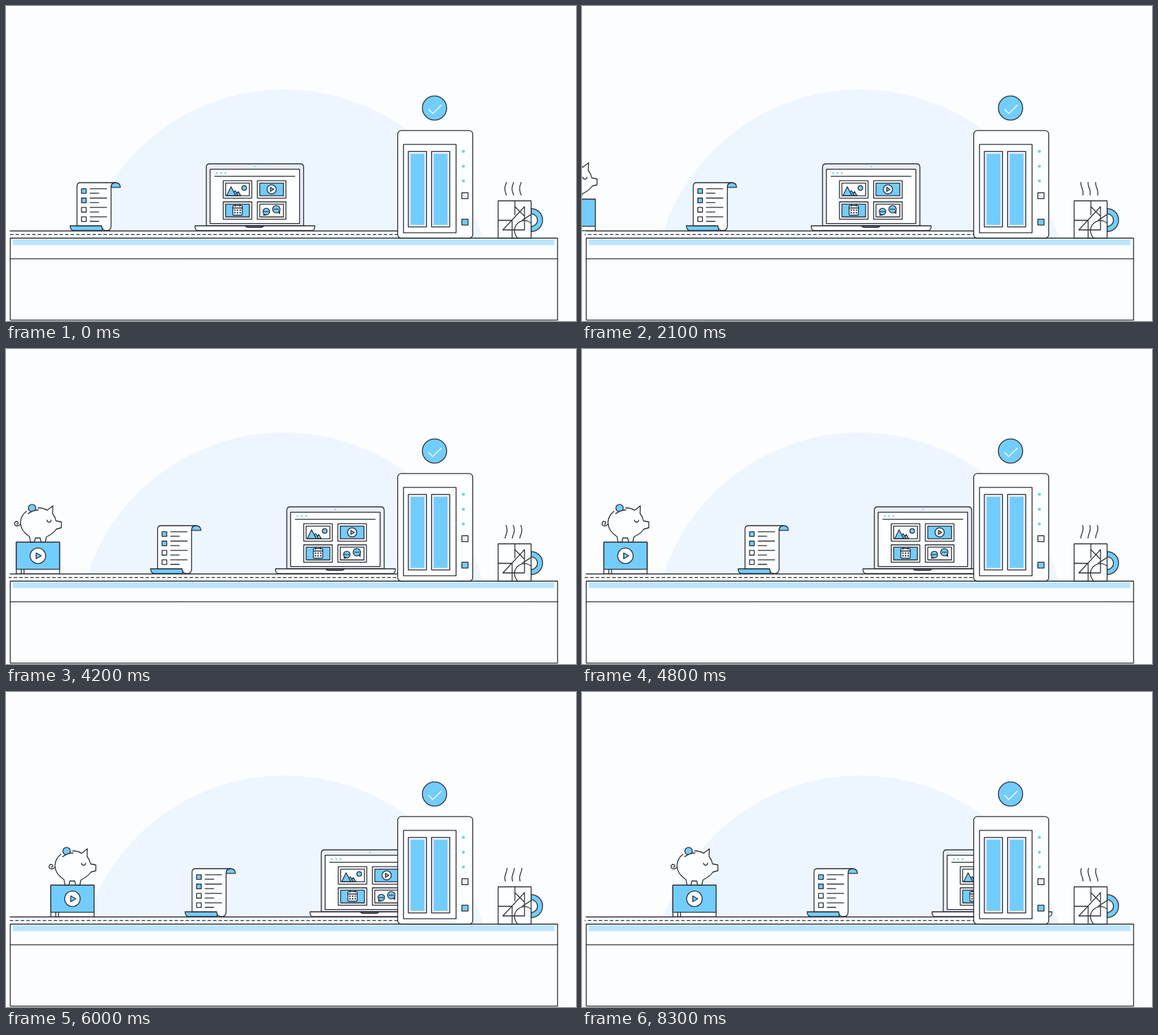
Write an HTML page that moves like this. It is 830 by 460 pixels and loops after 8500 ms.

```html
<!DOCTYPE html>
<html lang="en">
<head>
<meta charset="utf-8">
<title>Conveyor</title>
<style>
  html, body { margin: 0; width: 100%; height: 100%; overflow: hidden; background: #fcfdff; }
  svg { display: block; width: 830px; height: 460px; }
  .ink { fill: none; stroke: #2b2f36; stroke-width: 1.3; stroke-linejoin: round; stroke-linecap: round; }
  .w { fill: #fdfeff; }
  .b { fill: #72cdff; }
  .g { fill: #e9edf5; }
  .dot { fill: #72cdff; stroke: none; }
  .pip { fill: #2b2f36; stroke: none; }
</style>
</head>
<body>
<svg viewBox="0 0 830 460">
  <circle cx="405" cy="423.5" r="301.5" fill="#edf6fe"/>
  <rect y="339" width="830" height="121" fill="#fcfdff"/>

  <g class="ink">
    <!-- belt -->
    <path d="M6 328.5H570V339H6Z" class="w" stroke="none"/>
    <path d="M6 328.5H570"/>
    <path id="dashes" d="M4 333.7H570" stroke-dasharray="5 3" stroke-linecap="butt"/>

    <g id="cargo">
      <!-- book and piggy bank -->
      <g transform="translate(-234.5 0)">
        <rect x="132.3" y="282.2" width="63" height="46" class="w"/>
        <rect x="132.3" y="282.2" width="63" height="39.4" class="b"/>
        <path d="M139.5 322V328M143.5 322V328"/>
        <circle cx="163.7" cy="302" r="11.3" class="w"/>
        <path d="M161.2 297.8L168.6 302L161.2 306.2Z" class="b"/>
        <path class="w" stroke="none" d="M147 237Q153 232 164 232Q172 232 177 235.5L185.5 229L185 240Q189 245 190 251L197.8 252.5V261L190.5 263Q187 269 176 274.5L174.5 282H168.5L167 276H160L158.5 282H153L151.5 274Q138.5 266 138.3 253Q139 243 147 237Z"/>
        <path d="M164 232Q172 232 177 235.5L185.5 229L185 240Q189 245 190 251L197.8 252.5V261L190.5 263Q187 269 176 274.5L174.5 282H168.5L167 276H160L158.5 282H153L151.5 274Q138.5 266 138.3 253Q139 243 147 237"/>
        <circle cx="155.2" cy="232.3" r="5.4" class="b"/>
        <path d="M149.5 240.5Q155 235.5 164.5 235L164 239Q157 238 150 242Z" class="w" stroke="none"/>
        <path d="M149.5 240.5Q156 235.5 164.5 235"/>
        <path d="M177 250Q177.3 253 180 253Q182.7 253 183 250"/>
        <path d="M138.3 256Q134 260 130.6 257.5Q128.5 254.5 131.5 251.8Q135 251.5 135 254.5Q134.5 256.5 132.7 255.5"/>
      </g>

      <!-- checklist -->
      <path class="b" d="M93.3 321H140V328H99Q93.8 328 93.3 321Z"/>
      <path class="w" d="M103.4 321V263Q103.4 258 108.5 258H160Q153 258.5 153 265V321Q153 328 146.3 328Q139.8 328 139.2 321Z"/>
      <path class="b" d="M153 264.8Q153 258 159.5 258Q166 258 166.6 264.8Z"/>
      <g id="checks"></g>

      <!-- laptop -->
      <path class="g" d="M291.6 321V235.5Q291.6 230.5 296.6 230.5H428.4Q433.4 230.5 433.4 235.5V321Z"/>
      <rect x="297.2" y="238.3" width="130.3" height="79.3" class="w"/>
      <circle cx="362.3" cy="234.3" r="1.1" class="dot"/>
      <circle cx="307" cy="244" r="1.3" class="dot"/>
      <circle cx="313.3" cy="244" r="1.3" class="dot"/>
      <circle cx="319.6" cy="244" r="1.3" class="dot"/>
      <path d="M304 248.7H420.5"/>
      <g id="tiles"></g>
      <path class="b" d="M321.5 276.8L327.7 264L334.5 276.8ZM331.5 271.5L334 269.8L337.5 276.8H334.5ZM336 273.5L338.3 271L341.7 276.8H337.5Z"/>
      <circle cx="346.8" cy="265.8" r="3.4" class="b"/>
      <circle cx="386.8" cy="267.8" r="6.7" class="w"/>
      <path class="b" d="M385 264.8L390 267.8L385 270.8Z"/>
      <rect x="330.3" y="291.3" width="13.6" height="14.2" rx="1" class="w"/>
      <path d="M330.3 295H344M333.5 289.5V292.5M340.7 289.5V292.5"/>
      <g id="days"></g>
      <g id="bubbles"></g>
      <path class="w" d="M275.2 321H449.6V323.5Q449 328 444 328H281Q275.8 328 275.2 323.5Z"/>
      <path d="M348.5 321.3H375.3Q374 323.4 371 323.4H353Q349.8 323.4 348.5 321.3Z" fill="#7d8590"/>
    </g>

    <!-- desk -->
    <rect x="6.2" y="339" width="797" height="119.6"/>
    <rect x="10" y="341" width="788.5" height="8.2" fill="#bae5fe" stroke="none"/>
    <path d="M6.2 369.2H803.2"/>

    <!-- machine -->
    <rect x="570.4" y="181.9" width="109.2" height="157.1" rx="5" class="w"/>
    <rect x="578.8" y="202.2" width="76.6" height="129" class="w"/>
    <g id="doors"></g>
    <circle cx="666" cy="212.3" r="2.2" class="dot"/>
    <circle cx="666" cy="234" r="2.2" class="dot"/>
    <circle cx="666" cy="255.4" r="2.2" class="dot"/>
    <rect x="663.8" y="272.7" width="9" height="8.6" class="g"/>
    <rect x="663.8" y="311.3" width="9" height="8.6" class="b"/>
    <circle cx="624" cy="149" r="17.7" class="b"/>
    <path d="M615.3 151L621.3 157L634 144.8" style="stroke:#fff"/>

    <!-- mug -->
    <path class="b" d="M764.6 295.8A16.8 16.8 0 0 1 764.6 329.4V322A9.3 9.3 0 0 0 764.6 303.4Z"/>
    <rect x="716.6" y="284.5" width="48" height="54.5" class="w"/>
    <path d="M741 284.5V305M716.6 313H737M737 313V339M755 293L723.5 327H755ZM741 293L754 306M764.6 304.5L752 312.5"/>
    <path d="M764.6 317A13 13 0 1 0 745.5 339"/>
    <path id="steam"/>
  </g>
</svg>
<script>
  const $ = id => document.getElementById(id);
  const rect = (x, y, w, h, c) => `<rect x="${x}" y="${y}" width="${w}" height="${h}" class="${c}"/>`;
  const circle = (x, y, r, c) => `<circle cx="${x}" cy="${y}" r="${r}" class="${c}"/>`;

  for (let i = 0; i < 4; i++) {
    const y = 266.8 + i * 13.7;
    $('checks').innerHTML += rect(110, y, 6.8, 6.8, i < 2 ? 'b' : 'w') +
      `<path d="M122.5 ${y}H146.5M122.5 ${y + 6.6}H135"/>`;

    const tx = 316.3 + (i % 2) * 49.7, ty = 255.2 + (i >> 1) * 30.8;
    $('tiles').innerHTML += rect(tx, ty, 41.6, 25.4, 'w') +
      rect(tx + 3.5, ty + 3.4, 34.6, 18.6, i === 1 || i === 2 ? 'b' : 'w');
  }
  for (let i = 0; i < 6; i++)
    $('days').innerHTML += rect(332.4 + (i % 3) * 3.8, 297.2 + (i > 2) * 3.8, 2, 2, 'pip');
  for (const [x, y, r] of [[379, 300.2, 4.8], [393.6, 296.8, 5.4]]) {
    $('bubbles').innerHTML += circle(x, y, r, 'b') +
      [-2.5, 0, 2.5].map(d => circle(x + d, y, 1, 'pip')).join('');
  }
  $('bubbles').innerHTML += '<path d="M375.5 303.8L375 305.5L378 305M396.5 301.5L398.5 303V299.5"/>';
  for (const x of [585.8, 619.6])
    $('doors').innerHTML += rect(x, 212.4, 26.6, 110.2, 'g') + rect(x + 3.3, 215.8, 20, 103.8, 'dot');

  const LOOP = 8500, STEP = 300, LAST = 8300, SPEED = 8.375;

  function steamPath(phase) {
    let d = '';
    for (const cx of [728, 738.5, 749.5]) {
      for (let k = 0; k <= 12; k++) {
        const u = k / 12 - 0.5;
        const x = cx - 1.6 * Math.cos(4 * u + phase);
        d += `${k ? 'L' : 'M'}${x.toFixed(2)} ${(266.8 + u * 18.5).toFixed(2)}`;
      }
    }
    return d;
  }

  function draw(now) {
    const t = now % LOOP;
    const n = t >= LAST ? 28 : Math.floor(t / STEP);
    const dx = n * SPEED;
    $('cargo').setAttribute('transform', `translate(${dx} 0)`);
    $('dashes').setAttribute('stroke-dashoffset', -(2 + dx));
    $('steam').setAttribute('d', steamPath(n / 24 * 2 * Math.PI));
  }

  let start;
  function tick(now) {
    start ??= now;
    draw(now - start);
    requestAnimationFrame(tick);
  }
  draw(0);
  requestAnimationFrame(tick);
</script>
</body>
</html>
```
